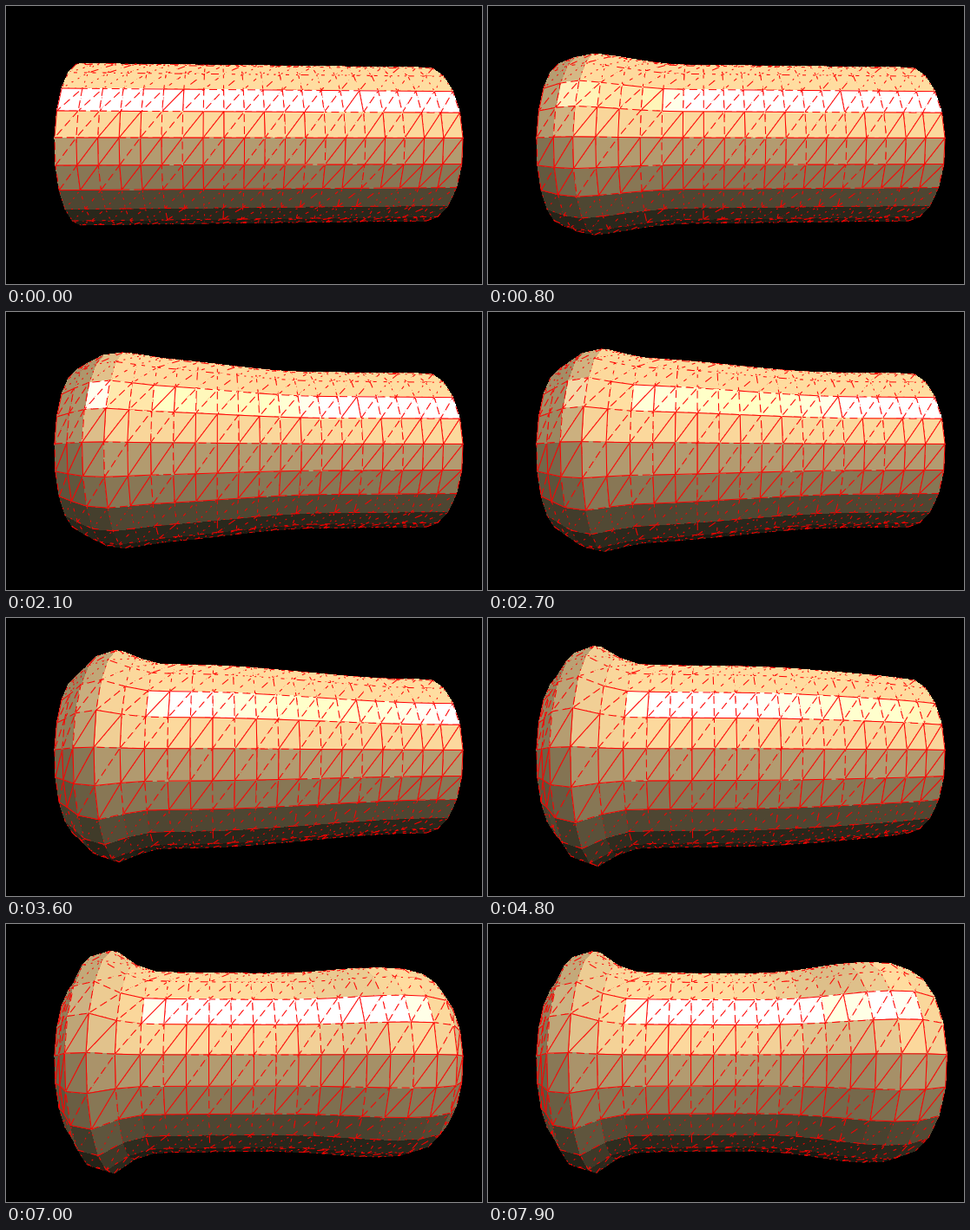
A matplotlib script that plays this animation: 548 by 321 pixels, repeating every 8000 ms.

```python
import numpy as np
import matplotlib.pyplot as plt
from matplotlib.animation import FuncAnimation
from matplotlib.collections import PolyCollection

W, H, DPI = 548, 321, 64
FRAMES, STEP = 80, 100
SEGS, SIDES = 20, 22
HALF = 2.152                                # half length, in rest radii
DIST, FOCAL = 5.4, 483
YAW, SHIFT_X = 0.062, 0.158
CX, CY = 274, 159.3
PHASE = 3.7                                 # turn of the first side, degrees

ring = np.arange(SEGS + 1)
theta = np.radians(PHASE) + 2 * np.pi * np.arange(SIDES) / SIDES

# two triangles per quad, split from lower left to upper right
k, j = [g.ravel() for g in np.meshgrid(range(SEGS), range(SIDES), indexing="ij")]
up = (j + 1) % SIDES
a, b = k * SIDES + j, (k + 1) * SIDES + j
c, d = (k + 1) * SIDES + up, k * SIDES + up
TRIS = np.concatenate([np.stack([a, b, c], 1), np.stack([a, c, d], 1)])

SKIN = np.array([255, 219, 158]) / 255
GLINT = np.array([-0.07, np.sin(np.radians(28.2)), np.cos(np.radians(28.2))])


def ramp(x):
    return np.clip(x, 0, 1)


def smooth(x):
    x = ramp(x)
    return x * x * (3 - 2 * x)


def bell(x, mid, width):
    return np.exp(-((x - mid) / width)**2)


# both rims are clamped
PIN = (1 - bell(ring, 0, 1.1)) * (1 - bell(ring, SEGS, 0.8))


def swelling(t):
    """Pressure front from the left, a growing flare, then the rebound."""
    front = 2.4 + 5.9 * t - 0.33 * t**2
    width = min(12.5, 4 + 2.9 * t)
    wave = (0.18 - 0.007 * t) * (1 - np.exp(-t / 0.4))
    s = ramp((t - 1.4) / 5.2)
    flare = 0.27 * np.sin(np.pi / 2 * s) * bell(ring, 3 - 0.3 * s, 1.2)
    rebound = 0.178 * ramp((t - 5.2) / 2.7)**1.3 * bell(ring, 17.5, 3.55)
    return PIN * (wave * smooth((front - ring) / width) + flare + rebound)


def slide(t):
    """Rings drift left, and near the right rim finally to the right."""
    pull = 0.262 * np.sin(np.pi / 2 * ramp(t / 6.2))**1.2 * (1 - ring / 19.5)
    push = 0.16 * ramp((t - 5.2) / 2.7)**1.3 * np.exp((ring - 19) / 2)
    return PIN * (push - pull)


def mesh(t):
    q = 1 + swelling(t)
    r = q * DIST / np.sqrt(DIST**2 - 1 + q**2)
    x = np.linspace(-HALF, HALF, SEGS + 1) + slide(t)
    return np.stack([np.repeat(x, SIDES),
                     np.outer(r, np.sin(theta)).ravel(),
                     np.outer(r, np.cos(theta)).ravel()], 1)


def project(p):
    x, y, z = p.T
    cos = np.sqrt(1 - YAW**2)
    depth = DIST + x * YAW - z * cos
    sx = CX + FOCAL * (SHIFT_X + x * cos + z * YAW) / depth
    return np.stack([sx, CY - FOCAL * y / depth], 1), depth


def shade(tri):
    n = np.cross(tri[:, 1] - tri[:, 0], tri[:, 2] - tri[:, 0])
    n /= np.linalg.norm(n, axis=1, keepdims=True)
    nx, ny = n[:, 0], n[:, 1]
    light = np.interp(ny, [-1, -.81, -.61, -.36, -.08, .2, .46],
                      [.08, .155, .3, .53, .7, .98, 1])
    light *= 1 - 0.45 * np.tanh(2 * np.maximum(-nx, 0))
    light *= 1 - 0.22 * np.maximum(nx, 0)**2
    light = light[:, None]
    glint = 0.52 * np.exp(-((n - GLINT)**2).sum(1) / 0.14**2)[:, None]
    tint = (1 - light) * [0, 0.02, 0.01]
    return np.clip(SKIN * light + tint + glint, 0, 1)


def pick_styles():
    """Solid or broken line for each triangle; broken towards the outline."""
    rng = np.random.default_rng(4)
    loose = [(0, (4, 8)), (2, (9, 9)), (1, (2, 6))]
    styles = []
    for row in np.tile(j, 2):
        mid = (PHASE + (row + 0.5) * 360 / SIDES + 180) % 360 - 180
        solid = 0.35 if mid > 20 else 0.7
        if mid > 36 or mid < -30:
            styles.append(loose[rng.integers(len(loose))])
        elif rng.random() < solid:
            styles.append("solid")
        else:
            styles.append((0, (9, 5)))
    return styles


STYLES = pick_styles()

fig = plt.figure(figsize=(W / DPI, H / DPI), dpi=DPI, facecolor="black")
ax = fig.add_axes([0, 0, 1, 1])
ax.set(xlim=(0, W), ylim=(H, 0))
ax.axis("off")
# each triangle is drawn twice: crisp fill, then thin outline
tube = PolyCollection([], edgecolors=["none", "red"], linewidths=72 / DPI,
                      antialiaseds=[False, True], joinstyle="round",
                      capstyle="butt")
ax.add_collection(tube, autolim=False)


def draw(i):
    pts = mesh(i * STEP / 1000)
    flat, depth = project(pts)
    tri = flat[TRIS]
    u, v = tri[:, 1] - tri[:, 0], tri[:, 2] - tri[:, 0]
    front = np.flatnonzero(u[:, 0] * v[:, 1] - u[:, 1] * v[:, 0] < 0)
    order = front[np.argsort(-depth[TRIS[front]].mean(1))]
    order = np.repeat(order, 2)
    fill = np.ones((len(order), 4))
    fill[:, :3] = shade(pts[TRIS[order]])
    fill[1::2, 3] = 0
    tube.set_verts(tri[order])
    tube.set_facecolor(fill)
    tube.set_linestyle([STYLES[n] for n in order])
    return [tube]


anim = FuncAnimation(fig, draw, frames=FRAMES, interval=STEP,
                     repeat=True, repeat_delay=0, blit=False)
plt.show()
```
